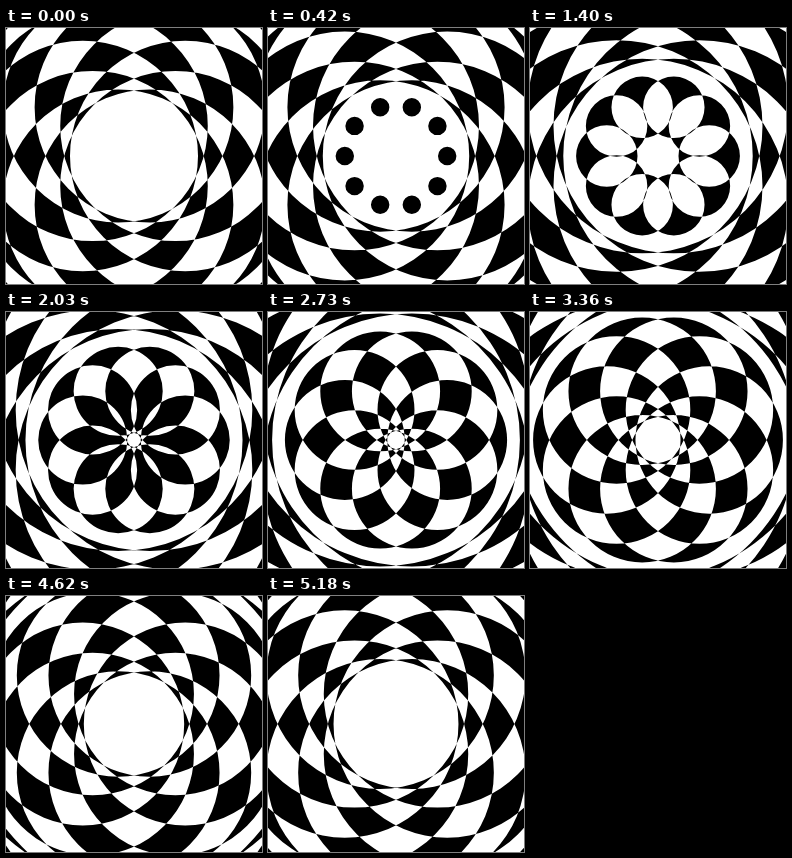
Write an HTML page that moves like this. It is 256 px wide and 256 px high and loops after 5250 ms.

```html
<!DOCTYPE html>
<html lang="en">
<head>
<meta charset="utf-8">
<title>Expanding circles</title>
<style>
  html, body { margin: 0; width: 100%; height: 100%; overflow: hidden; background: #fff; }
  svg { display: block; width: 100%; height: 100%; }
</style>
</head>
<body>
<svg viewBox="-128 -128 256 256">
  <path id="rings" fill="#000" fill-rule="evenodd"/>
</svg>
<script>
  const STEP = 70, STEPS = 75;
  const PETALS = 10, GENERATIONS = 3;
  const RING = 51.2;      // distance of each circle's centre from the middle
  const GROWTH = 115.2;   // radius gained per loop
  const rings = document.getElementById('rings');

  function circle(x, y, r) {
    return `M${x - r} ${y}a${r} ${r} 0 1 0 ${2 * r} 0a${r} ${r} 0 1 0 ${-2 * r} 0z`;
  }

  // Overlaps alternate black and white through the even-odd fill.
  function draw(ms) {
    const phase = Math.floor(ms / STEP) % STEPS / STEPS;
    let d = '';
    for (let g = 0; g < GENERATIONS; g++) {
      const r = GROWTH * (phase + g);
      if (r === 0) continue;
      for (let i = 0; i < PETALS; i++) {
        const angle = 2 * Math.PI * i / PETALS;
        d += circle(RING * Math.cos(angle), RING * Math.sin(angle), r);
      }
    }
    rings.setAttribute('d', d);
  }

  const start = performance.now();
  function tick() {
    draw(performance.now() - start);
    requestAnimationFrame(tick);
  }
  tick();
</script>
</body>
</html>
```
